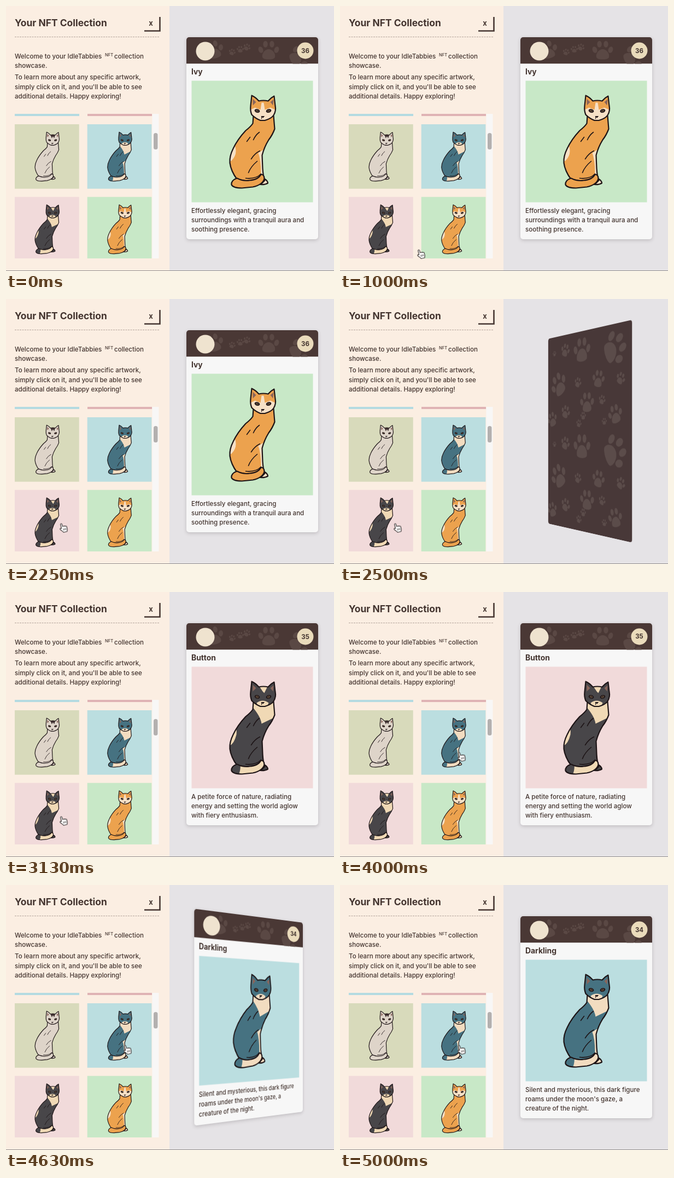
Animation of 600x484 px, one loop 5870 ms. Source, as an HTML page:

```html
<!DOCTYPE html>
<html lang="en">
<head>
<meta charset="utf-8">
<title>Cat collection</title>
<style>
  html, body { margin: 0; width: 100%; height: 100%; overflow: hidden; background: #e5e3e6; }
  #stage { position: relative; width: 600px; height: 484px; overflow: hidden; }
  svg { position: absolute; left: 0; top: 0; display: block; }
  text { font: 500 11.6px Inter, "Open Sans", sans-serif; fill: #43342f; }
  .bold { font-weight: 700; }

  #scene { position: absolute; left: 329.5px; top: 56.5px; width: 241px; height: 369px; perspective: 1000px; }
  #card { position: absolute; inset: 0; transform-style: preserve-3d; animation: flip 5870ms linear infinite; }
  .face { position: absolute; inset: 0; border-radius: 5px; overflow: hidden; backface-visibility: hidden; }
  .front { background: #f7f7f7; box-shadow: 0 2px 6px rgba(60, 50, 55, .22); }
  .back { background: #483838; transform: rotateY(180deg); }

  .info { animation: 5870ms step-end infinite; }
  #info0 { animation-name: first; }
  #info1 { animation-name: second; }
  #info2 { animation-name: third; }
  #hand { animation: point 5870ms linear infinite; }

  @keyframes flip {
    0%, 100% { transform: rotateY(0deg); }
    38.5% { transform: rotateY(0deg); animation-timing-function: ease-in-out; }
    45% { transform: rotateY(180deg); }
    45.23% { transform: rotateY(180deg); animation-timing-function: ease; }
    53.322% { transform: rotateY(0deg); }
    68.109% { transform: rotateY(0deg); animation-timing-function: ease-in-out; }
    74.583% { transform: rotateY(180deg); }
    74.753% { transform: rotateY(180deg); animation-timing-function: ease; }
    82.964% { transform: rotateY(0deg); }
  }
  @keyframes first { 0% { visibility: visible; } 45.23%, 100% { visibility: hidden; } }
  @keyframes second { 0% { visibility: hidden; } 45.23% { visibility: visible; } 74.753%, 100% { visibility: hidden; } }
  @keyframes third { 0% { visibility: hidden; } 74.753%, 100% { visibility: visible; } }
  @keyframes point {
    0% { opacity: 0; transform: translate(146px, 449px); animation-timing-function: step-end; }
    14.99% { opacity: 1; transform: translate(146px, 449px); animation-timing-function: ease-in-out; }
    23.51% { opacity: 1; transform: translate(97px, 409px); }
    60.5% { opacity: 1; transform: translate(97px, 409px); animation-timing-function: ease-in-out; }
    68%, 100% { opacity: 1; transform: translate(214px, 292px); }
  }
</style>
</head>
<body>
<div id="stage">
  <svg width="600" height="484" viewBox="0 0 600 484">
    <defs>
      <path id="torso" d="M113 64L112 78Q108 84 99 91Q84 107 76 124Q69 138 70 150Q72 165 83 180L128 188L134 182Q131 176 130 160L129 136Q133 121 141 108Q148 99 152 88L150 64Z"/>
      <path id="head" d="M110 27L108 46Q107 55 110 62Q117 69 126 72.500L134 72.500Q146 69 150 63Q155 55 153 46L151 28Q145 31 140 37Q131 35 123 37Q117 30 110 27Z"/>
      <path id="tail" d="M83 178Q72 182 73 190Q76 196 92 196L112 194Q130 190 133 179Q133 171 127 171Q122 181 106 182Q95 184 83 178Z"/>
      <clipPath id="inTorso"><use href="#torso"/></clipPath>
      <clipPath id="inHead"><use href="#head"/></clipPath>
      <clipPath id="inTail"><use href="#tail"/></clipPath>
      <clipPath id="list"><rect x="16" y="197" width="264" height="264"/></clipPath>
      <clipPath id="banner"><rect x="-1" y="-1" width="243" height="49"/></clipPath>
      <g id="paw">
        <path d="M0-4C10-4 16 8 13 14C9 19-9 19-13 14C-16 8-10-4 0-4Z"/>
        <ellipse cx="-17" cy="-3" rx="5" ry="7" transform="rotate(-20 -17 -3)"/>
        <ellipse cx="-7" cy="-15" rx="5" ry="7"/>
        <ellipse cx="7" cy="-15" rx="5" ry="7"/>
        <ellipse cx="17" cy="-3" rx="5" ry="7" transform="rotate(20 17 -3)"/>
      </g>
    </defs>
    <rect width="299" height="484" fill="#fbeee2"/>
    <text class="bold" x="16" y="37.2" style="font-size:17.4px">Your NFT Collection</text>
    <path d="M253 45.5H281.5V20" fill="none" stroke="#463632" stroke-width="2.6"/>
    <text class="bold" x="265" y="36" text-anchor="middle" style="font-size:13px">x</text>
    <path d="M16 56.5H281" stroke="#b3a49b" stroke-dasharray="3 1.5"/>
    <text x="16" y="95.7">Welcome to your IdleTabbies</text>
    <text x="181" y="91.5" style="font-size:7.6px">NFT</text>
    <text x="198" y="95.7">collection</text>
    <text x="16" y="113">showcase.</text>
    <text x="16" y="134.3">To learn more about any specific artwork,</text>
    <text x="16" y="151.6">simply click on it, and you'll be able to see</text>
    <text x="16" y="168.9">additional details. Happy exploring!</text>
    <g clip-path="url(#list)">
      <path d="M16 197h118v4H16z" fill="#b3dbe1"/>
      <path d="M149 197h118v4H149z" fill="#dfb3b4"/>
      <g id="tiles"></g>
      <path d="M267.5 197h12v264h-12z" fill="#f8f7f6"/>
      <rect x="270" y="232" width="7.5" height="30" rx="3.5" fill="#b3b0af"/>
    </g>
    <path d="M0 483.5H600" stroke="#918d8d"/>
  </svg>

  <div id="scene">
    <div id="card">
      <div class="face front">
        <svg width="241" height="369" viewBox="-.5 -.5 241 369">
          <path d="M-1-1h243v48.700h-243z" fill="#4a3835"/>
          <g id="crest" fill="#5a4844" clip-path="url(#banner)"></g>
          <circle cx="34" cy="25" r="17" fill="#efe3cf"/>
          <circle cx="217" cy="24" r="15" fill="#eadbbb"/>
          <g id="infos"></g>
        </svg>
      </div>
      <div class="face back">
        <svg width="241" height="369" viewBox="-.5 -.5 241 369">
          <g id="print" fill="#5b4c4a"></g>
        </svg>
      </div>
    </div>
  </div>

  <svg width="600" height="484" viewBox="0 0 600 484">
    <g id="hand">
      <g transform="rotate(-14 7 9)" stroke="#2b2524" stroke-width="1.1" stroke-linejoin="round">
        <path fill="#fff" d="M4.3 9.5V2.3Q4.3.8 5.7.8T7.1 2.3V6.4Q8.5 5.4 9.7 6.7Q11 5.9 12 7.2Q14.4 6.6 14.4 9V12.3Q14 15 13 17.2H6.4Q5 14.5 2.3 11.8Q.8 9.8 2.1 9.1Q3.2 8.6 4.3 9.5Z"/>
        <path fill="none" stroke-width=".8" d="M7.4 10.5V14M9.6 10.5V14M11.8 10.5V14"/>
      </g>
    </g>
  </svg>
</div>

<script>
  const $ = id => document.getElementById(id);
  const chest = "M110 66H153V92L128 104Q126 90 110 72Z";
  const leg = "M122 132L131 126V190H126Q129 150 122 132Z";
  const muzzle = "M119 66Q130 58 141 66L138 73H122Z";
  const tailTip = "M88 168H140V200H84Q92 190 88 168Z";

  const cats = {
    ash: { bg: "#d8dabb", coat: "#ded4c9", light: "#ded4c9", foot: "#ded4c9",
           mark: "M123 36L140 36L136 48L132 41L128 48Z" },
    blue: { bg: "#bbdee0", coat: "#467281", light: "#f2dcc0", foot: "#f2dcc0",
            body: chest + leg, face: muzzle, tail: tailTip },
    black: { bg: "#f1dada", coat: "#484649", light: "#f0d9b5", foot: "#484649",
             body: chest + "M66 150L72 112Q84 104 82 124Q78 140 70 144Z",
             face: muzzle + "M124 36H139L133 48L130 45Z", tail: tailTip },
    ginger: { bg: "#c8e8c7", coat: "#eca24e", light: "#f6e0c6", foot: "#f6e0c6",
              body: leg + "M66 150Q70 122 79 118Q85 134 73 146Z",
              face: "M106 54L116 49L126 53L128 40H132L134 53L144 49L155 54Q152 66 140 73H122Q110 66 106 54Z" }
  };

  const eye = (x, tilt) => `<g transform="translate(${x} 55) rotate(${tilt})">
    <ellipse rx="5" ry="3.3" fill="#211719"/><ellipse rx="2.4" ry="1.8" fill="#80654c"/><circle r="1.1" fill="#120d0e"/></g>`;

  function cat(kind, x, y, size) {
    const c = cats[kind];
    const part = (name, patch = "") => {
      const shape = "#" + name.toLowerCase();
      return `<use href="${shape}" fill="${c.coat}" stroke="none"/>
        <path d="${patch}" fill="${c.light}" stroke="none" clip-path="url(#in${name})"/>
        <use href="${shape}" fill="none"/>`;
    };
    return `<g transform="translate(${x} ${y}) scale(${size / 222})">
      <rect width="222" height="222" fill="${c.bg}"/>
      <g stroke="#1d1416" stroke-width="2.2" stroke-linejoin="round" stroke-linecap="round">
        <path d="M127 179L133 179Q139 182 139.500 187Q133 191 122 189Z" fill="${c.foot}"/>
        ${part("Torso", c.body)}
        <path d="M124 94Q117 99 113 108M107 103L101 111M125 128Q115 133 109 143M120 147Q108 157 104 168M99 178Q118 180 127 170" fill="none" stroke-width="1.6"/>
        ${part("Tail", c.tail)}
        ${part("Head", c.face)}
        <path d="${c.mark || ""}" fill="#3a2c2c" stroke="none"/>
        <path d="M112 33L112 45L118 39ZM150 34L149 45L144 39Z" fill="#8a655b" stroke="none"/>
        <g stroke="none">${eye(120, 18)}${eye(141, -18)}</g>
        <path d="M128 65H133L130.5 67.5ZV69.5" fill="#2a1b1c" stroke-width="1"/>
      </g>
    </g>`;
  }

  $("tiles").innerHTML = ["ash", "blue", "black", "ginger"]
    .map((k, i) => cat(k, 16 + i % 2 * 132.7, i < 2 ? 216 : 348.7, 117.7)).join("");

  const details = [
    ["ginger", 36, "Ivy", "Effortlessly elegant, gracing", "surroundings with a tranquil aura and", "soothing presence."],
    ["black", 35, "Button", "A petite force of nature, radiating", "energy and setting the world aglow", "with fiery enthusiasm."],
    ["blue", 34, "Darkling", "Silent and mysterious, this dark figure", "roams under the moon's gaze, a", "creature of the night."]
  ];
  $("infos").innerHTML = details.map(([kind, num, name, ...lines], i) =>
    `<g class="info" id="info${i}">
      <text class="bold" x="217" y="28" text-anchor="middle" style="font-size:11.5px">${num}</text>
      <text class="bold" x="8.5" y="67.5" style="font-size:13.9px">${name}</text>
      ${cat(kind, 9, 79, 222)}
      ${lines.map((s, n) => `<text x="8.5" y="${320.3 + n * 17.3}">${s}</text>`).join("")}
    </g>`).join("");

  // each paw: x, y, scale, rotation
  const paw = ([x, y, s, r]) => `<use href="#paw" transform="translate(${x} ${y}) rotate(${r}) scale(${s})"/>`;
  $("crest").innerHTML = [[50, 24, .8, -15], [83, 27, .28, 20], [98, 22, .3, 0], [110, 18, .3, 30],
    [150, 25, .85, 0], [205, 36, .9, 60]].map(paw).join("");

  const prints = [[56, 30, .6, 20], [21, 32, .25, 0], [107, 36, 1.1, 0], [195, 42, 1.35, 65],
    [36, 95, 1.1, -30], [95, 94, .45, 20], [154, 92, .75, 10], [212, 95, .5, 30],
    [122, 133, .9, 0], [164, 129, .4, 20], [14, 162, .7, -20], [57, 148, .6, 20],
    [111, 156, .35, 0], [98, 170, .35, 15], [199, 156, .8, -15], [170, 167, .3, 0]];
  $("print").innerHTML = [0, 178].map(dy =>
    prints.map(([x, y, s, r]) => paw([x, y + dy, s, r])).join("")).join("");
</script>
</body>
</html>
```
